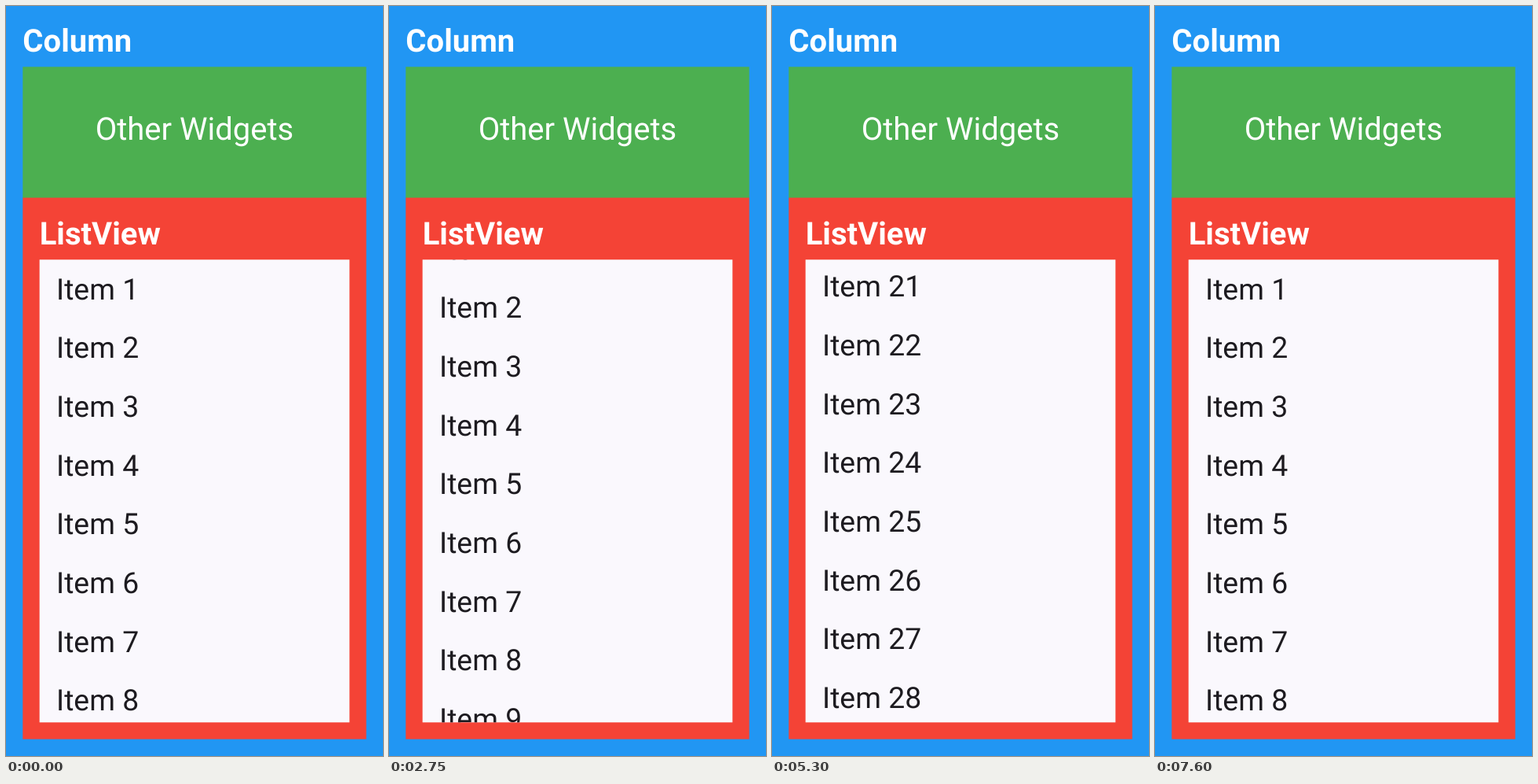
Animation, 480 px wide and 953 px high, one loop 8 s. Source, as an HTML page:

```html
<!DOCTYPE html>
<html lang="en">
<head>
<meta charset="utf-8">
<title>Column with ListView</title>
<style>
  html, body { margin: 0; width: 100%; height: 100%; overflow: hidden; background: #2196f3; }
  svg { display: block; width: 100%; height: 100%; }
  text { font-family: Roboto, Arial, sans-serif; text-rendering: geometricPrecision; }
  .label { font-size: 40px; fill: #fff; }
  .bold { font-weight: 700; }
  #items text { font-size: 37.33px; fill: #1d1b20; }
</style>
</head>
<body>
<svg viewBox="0 0 480 953">
  <defs>
    <clipPath id="view"><rect x="42.67" y="322.3" width="394.66" height="588"/></clipPath>
  </defs>
  <rect width="480" height="953" fill="#2196f3"/>
  <rect x="21.33" y="77.3" width="437.34" height="167" fill="#4caf50"/>
  <rect x="21.33" y="243.6" width="437.34" height="688" fill="#f44336"/>
  <rect x="42.67" y="322.3" width="394.66" height="588" fill="#faf8fd"/>
  <text class="label bold" x="21.33" y="57.8">Column</text>
  <text class="label" x="239.9" y="169.7" text-anchor="middle">Other Widgets</text>
  <text class="label bold" x="42.67" y="302.8">ListView</text>
  <g clip-path="url(#view)"><g id="items"></g></g>
</svg>
<script>
  const LOOP = 8000, STEP = 50, COUNT = 30, ROW = 74.667, VIEW = 588;
  const MAX = COUNT * ROW - VIEW;
  const DRAG_MS = 127, DRAG_PX = 75;

  // Each swipe: start time (ms), fling length (s), direction
  const swipes = [
    { at: 822, fling: 1.2, down: true },
    { at: 1990, fling: 1.3, down: false },
    { at: 4440, fling: 1.2, down: true },
    { at: 6350, fling: 1.25, down: false }
  ];

  const items = document.getElementById('items');
  for (let i = 0; i < COUNT; i++) {
    const row = document.createElementNS('http://www.w3.org/2000/svg', 'text');
    row.setAttribute('x', 64);
    row.setAttribute('y', 372.8 + i * ROW);
    row.textContent = 'Item ' + (i + 1);
    items.append(row);
  }

  // Finger drag, then a decelerating fling that stops at the list's end
  function travel(ms, fling) {
    if (ms < DRAG_MS) return DRAG_PX * (ms / DRAG_MS) ** 2;
    const u = Math.min(1, (ms - DRAG_MS) / 1000 / fling);
    const reach = 1037 * fling ** 2.358;
    return Math.min(MAX, DRAG_PX + reach * (1 - (1 - u) ** 2.358));
  }

  function offset(t) {
    const swipe = swipes.filter(s => s.at <= t).pop();
    if (!swipe) return 0;
    const d = travel(t - swipe.at, swipe.fling);
    return swipe.down ? d : MAX - d;
  }

  const start = performance.now();
  function draw(now) {
    const t = Math.floor((Math.max(0, now - start) + 8) / STEP) * STEP % LOOP;
    items.setAttribute('transform', `translate(0 ${-offset(t).toFixed(2)})`);
    requestAnimationFrame(draw);
  }
  draw(start);
</script>
</body>
</html>
```
